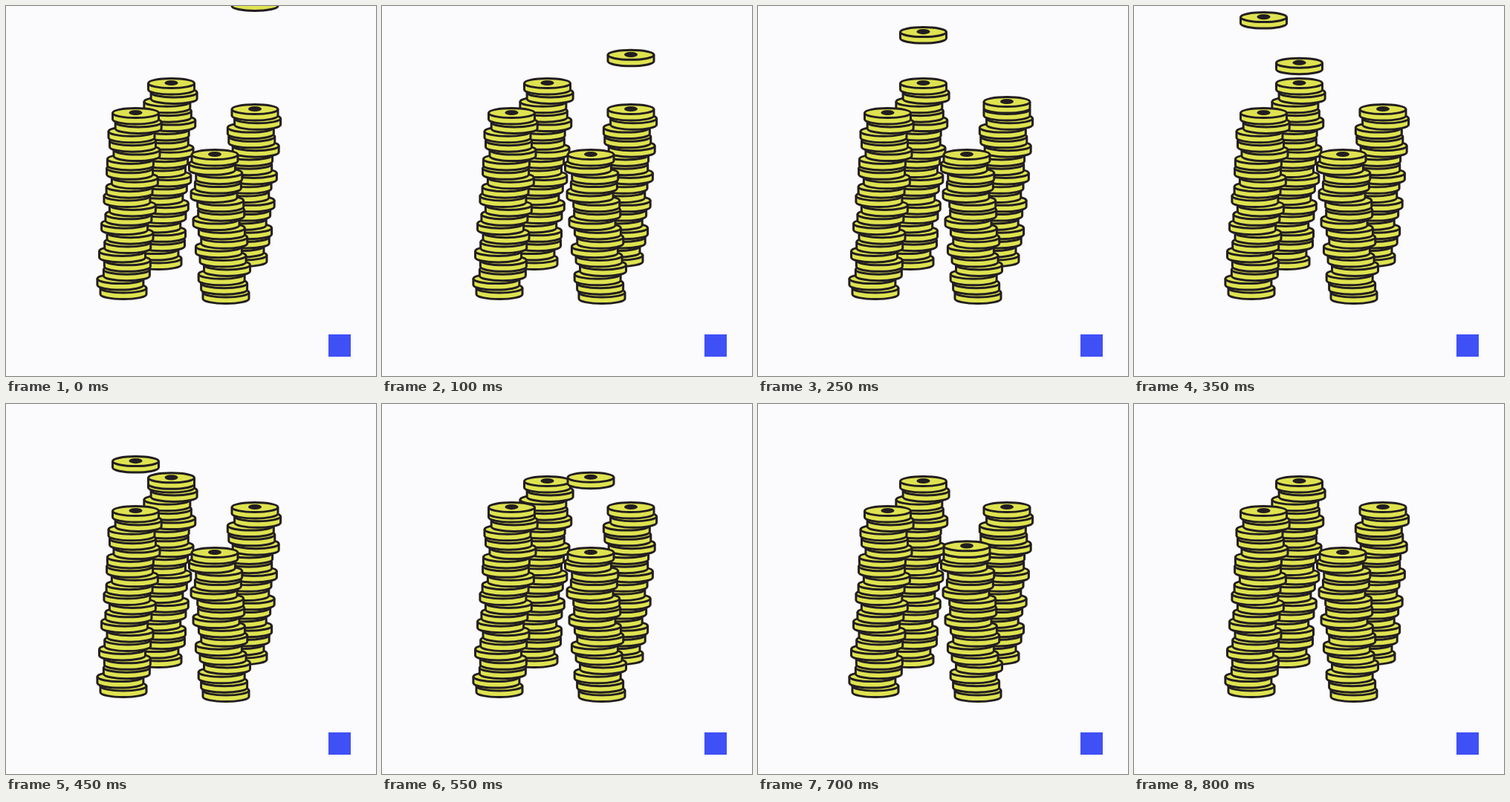
Animation, 498 px wide and 498 px high, one loop 0.85 s. Source, as an HTML page with a canvas:

```html
<!DOCTYPE html>
<html lang="en">
<head>
<meta charset="utf-8">
<title>Coin stacks</title>
<style>
  html, body { margin: 0; width: 100%; height: 100%; overflow: hidden; background: #fbfafc; }
  canvas { display: block; width: 498px; height: 498px; }
</style>
</head>
<body>
<canvas id="stage" width="498" height="498"></canvas>
<script>
const ctx = document.getElementById('stage').getContext('2d');
const SIZE = 498, LOOP = 850, STEP = 50;
const RX = 31, RY = 6.5, THICK = 8.5, EDGE = 3;
const HEIGHT = 2 * RY + THICK + EDGE;
const PITCH = 12.4, WOBBLE = 5;
const INK = '#221e20', GOLD = '#dfe350', BLUE = '#3f50f6', PAPER = '#fbfafc';

// Back to front. x0, x1: centre of the top and bottom coin.
// A coin falls from above the stage between start and end (ms).
const stacks = [
  { x0: 222.5, x1: 205, top: 96, bottom: 356, start: 163, end: 520, ease: 2 },
  { x0: 335, x1: 320, top: 131, bottom: 352, start: -9, end: 338, ease: 2 },
  { x0: 174.5, x1: 158, top: 136, bottom: 396, start: 299, end: 558, ease: 1 },
  { x0: 281, x1: 296, top: 192, bottom: 402, start: 452, end: 762, ease: 2 }
];

function coin(cx, top, marked) {
  const cy = top + RY + EDGE / 2;
  ctx.fillStyle = GOLD;
  ctx.beginPath();
  ctx.ellipse(cx, cy, RX, RY, 0, Math.PI, 0);
  ctx.ellipse(cx, cy + THICK, RX, RY, 0, 0, Math.PI);
  ctx.closePath();
  ctx.fill();
  ctx.stroke();
  ctx.beginPath();
  ctx.ellipse(cx, cy, RX, RY, 0, 0, Math.PI);
  ctx.stroke();
  if (!marked) return;
  ctx.fillStyle = INK;
  ctx.beginPath();
  ctx.ellipse(cx, cy - 0.5, 9, 3.6, 0, 0, 2 * Math.PI);
  ctx.fill();
}

function drawStack({ x0, x1, top, bottom, start, end, ease }, t) {
  const span = bottom - top - HEIGHT;
  const last = Math.round(span / PITCH);
  const side = Math.sign(x0 - x1);
  for (let i = last; i >= 0; i--) {
    const f = i / last;
    const wobble = i < last ? side * WOBBLE * Math.sin(2 * i) : 0;
    coin(x0 + (x1 - x0) * f + wobble, top + span * f, i === 0);
  }
  if (t < start || t >= end) return;
  const left = (end - t) / (end - start);
  coin(x0, top - (top + HEIGHT) * left ** ease, true);
}

function frame() {
  const t = Math.floor((performance.now() % LOOP) / STEP) * STEP;
  ctx.fillStyle = PAPER;
  ctx.fillRect(0, 0, SIZE, SIZE);
  ctx.strokeStyle = INK;
  ctx.lineWidth = EDGE;
  for (const stack of stacks) drawStack(stack, t);
  ctx.fillStyle = BLUE;
  ctx.fillRect(434, 442, 30, 30);
  requestAnimationFrame(frame);
}
frame();
</script>
</body>
</html>
```
